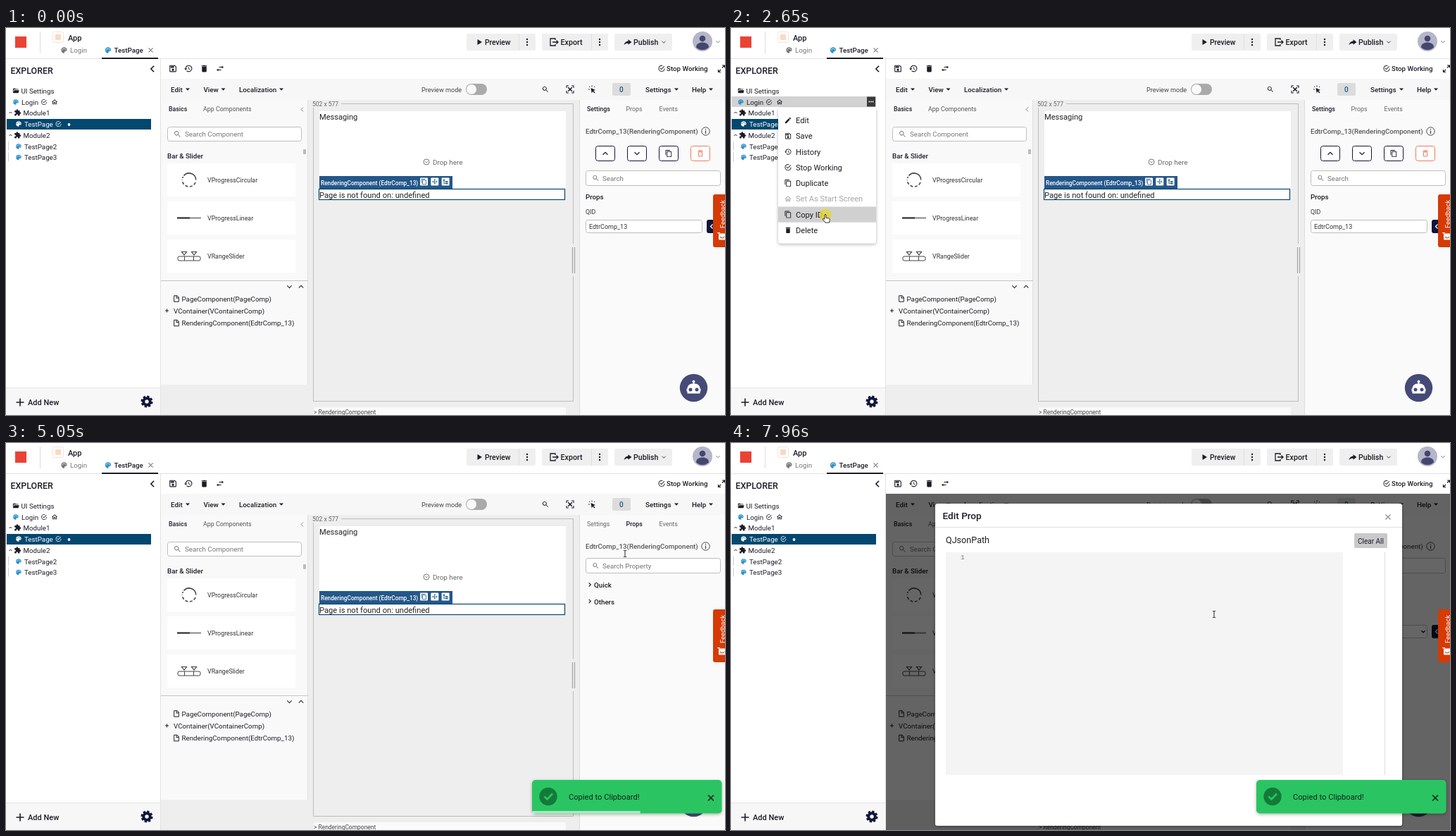
Write an HTML page that moves like this. It is 1021 by 549 pixels and loops after 8000 ms.

```html
<!DOCTYPE html>
<html lang="en">
<head>
<meta charset="utf-8">
<title>Page editor</title>
<style>
html, body { margin: 0; width: 100%; height: 100%; overflow: hidden; background: #fff; }
svg { display: block; width: 1021px; height: 549px; font-family: Roboto, Arial, sans-serif; }
#bar { transform-box: fill-box; transform-origin: 0 0; }
</style>
</head>
<body>
<svg id="stage" viewBox="0 0 1021 549"></svg>
<script>
const LOOP = 8000;
const INK = '#1c1c28', NAVY = '#11143a', BLUE = '#04476f', GREY = '#757575', SKY = '#2b8fce';

const ICONS = {
  save: 'M17 3H5a2 2 0 0 0-2 2v14a2 2 0 0 0 2 2h14a2 2 0 0 0 2-2V7zm2 16H5V5h11l3 3zM12 12a3 3 0 1 0 0 6 3 3 0 0 0 0-6zM6 6h9v4H6z',
  history: 'M13.5 8H12v5l4.3 2.5.7-1.2-3.5-2.1zM13 3a9 9 0 0 0-9 9H1l4 4 4-4H6a7 7 0 1 1 2 5l-1.4 1.4A9 9 0 1 0 13 3z',
  trash: 'M6 19a2 2 0 0 0 2 2h8a2 2 0 0 0 2-2V7H6zM19 4h-3.5l-1-1h-5l-1 1H5v2h14z',
  bin: 'M6 19a2 2 0 0 0 2 2h8a2 2 0 0 0 2-2V7H6zM8 9h8v10H8zM19 4h-3.5l-1-1h-5l-1 1H5v2h14z',
  swap: 'M22 8l-5-4v3h-8v2h8v3zM7 12l-5 4 5 4v-3h8v-2H7z',
  palette: 'M12 2a10 10 0 0 0 0 20c2 0 2-2 1-3s0-3 2-3h2a5 5 0 0 0 5-5c0-5-5-9-10-9zM5 10a1.6 1.6 0 1 0 3 0 1.6 1.6 0 0 0-3 0zM8 6a1.6 1.6 0 1 0 3 0 1.6 1.6 0 0 0-3 0zM13 6a1.6 1.6 0 1 0 3 0 1.6 1.6 0 0 0-3 0zM16 10a1.6 1.6 0 1 0 3 0 1.6 1.6 0 0 0-3 0z',
  folder: 'M19 20H4a2 2 0 0 1-2-2V6a2 2 0 0 1 2-2h6l2 2h7a2 2 0 0 1 2 2H4v10l2-8h17l-2 8.5c-.2.9-1 1.5-2 1.5z',
  puzzle: 'M20.5 11H19V7a2 2 0 0 0-2-2h-4V3.5a2.5 2.5 0 0 0-5 0V5H4a2 2 0 0 0-2 2v3.8h1.5a2.7 2.7 0 0 1 0 5.4H2V20a2 2 0 0 0 2 2h3.8v-1.5a2.7 2.7 0 0 1 5.4 0V22H17a2 2 0 0 0 2-2v-4h1.5a2.5 2.5 0 0 0 0-5z',
  check: 'M20 12a8 8 0 1 1-6-7.7l1.8-1.6A10 10 0 1 0 22 12zM8 10l-1.5 1.5L11 16 21 6l-1.4-1.4L11 13z',
  home: 'M12 5.7l5 4.5V18h-2v-6H9v6H7v-7.8zM12 3L2 12h3v8h6v-6h2v6h6v-8h3z',
  copy: 'M19 21H8V7h11zm0-16H8a2 2 0 0 0-2 2v14a2 2 0 0 0 2 2h11a2 2 0 0 0 2-2V7a2 2 0 0 0-2-2zm-3-4H4a2 2 0 0 0-2 2v14h2V3h12z',
  search: 'M9.5 3a6.5 6.5 0 0 1 4.9 10.7l6.1 5.3-1.5 1.5-5.3-6A6.5 6.5 0 1 1 9.5 3zm0 2a4.5 4.5 0 1 0 0 9 4.5 4.5 0 0 0 0-9z',
  pencil: 'M20.7 7c.4-.4.4-1 0-1.4l-2.3-2.3a1 1 0 0 0-1.4 0l-1.8 1.8 3.7 3.7zM3 17.2V21h3.8l11-11-3.7-3.8z',
  file: 'M13 9h5.5L13 3.5zM6 2h8l6 6v12a2 2 0 0 1-2 2H6a2 2 0 0 1-2-2V4c0-1.1.9-2 2-2zm5 2H6v16h12v-9h-7z',
  robot: 'M12 2a2 2 0 0 1 1 3.7V7h1a7 7 0 0 1 7 7h1v4h-1v3H3v-3H2v-4h1a7 7 0 0 1 7-7h1V5.7A2 2 0 0 1 12 2zM7.5 13a2.5 2.5 0 1 0 0 5 2.5 2.5 0 0 0 0-5zm9 0a2.5 2.5 0 1 0 0 5 2.5 2.5 0 0 0 0-5z',
  share: 'M13 9V5l9 7-9 7v-4C8 15 5 16 2 20c1-6 4-10 11-11z',
  move: 'M11 11V6H8l4-4 4 4h-3v5h5V8l4 4-4 4v-3h-5v5h3l-4 4-4-4h3v-5H6v3l-4-4 4-4v3z',
  tree: 'M3 3h7v5H7v3h6V9h8v5h-8v-1H7v5h6v-2h8v5h-8v-1H5V8H3z'
};

const text = (x, y, s, size = 9.75, fill = INK, weight = 400, more = '') =>
  `<text x="${x}" y="${y}" font-size="${size}" fill="${fill}" font-weight="${weight}" ${more}>${s}</text>`;
const bold = (x, y, s, size = 9.75, fill = INK) => text(x, y, s, size, fill, 500);
const rect = (x, y, w, h, fill, more = '') =>
  `<rect x="${x}" y="${y}" width="${w}" height="${h}" fill="${fill}" ${more}/>`;
const box = (x, y, w, h, stroke = '#bdbdbd', fill = '#fff', r = 3) =>
  rect(x + .5, y + .5, w - 1, h - 1, fill, `stroke="${stroke}" rx="${r}"`);
const line = (d, stroke = INK, w = 1, more = '') =>
  `<path d="${d}" fill="none" stroke="${stroke}" stroke-width="${w}" ${more}/>`;
const shape = (d, fill = INK) => `<path d="${d}" fill="${fill}"/>`;
const dot = (x, y, r, fill, more = '') => `<circle cx="${x}" cy="${y}" r="${r}" fill="${fill}" ${more}/>`;
const icon = (name, x, y, size = 12, fill = INK) =>
  `<path d="${ICONS[name]}" fill="${fill}" fill-rule="evenodd" transform="translate(${x - size / 2} ${y - size / 2}) scale(${size / 24})"/>`;
const group = (id, ...parts) => `<g id="${id}">${parts.join('')}</g>`;
const caret = (x, y) => shape(`M${x - 3} ${y - 1.5}h6l-3 3.2z`);
// dir is one of u, r, d, l
const chevron = (x, y, dir, s = 3, stroke = INK, w = 1.2) => {
  const turn = { u: 0, r: 90, d: 180, l: 270 }[dir];
  return line(`M${-s} ${s / 2}L0 ${-s / 2}L${s} ${s / 2}`, stroke, w, `transform="translate(${x} ${y}) rotate(${turn})"`);
};
const cross = (x, y, s, stroke, w = 1) =>
  line(`M${x - s} ${y - s}l${2 * s} ${2 * s}m0 ${-2 * s}l${-2 * s} ${2 * s}`, stroke, w);
const dots = (x, y, dx, dy, fill, r = 1.2) => [-1, 0, 1].map(k => dot(x + k * dx, y + k * dy, r, fill)).join('');

const header = () => [
  rect(0, 43, 1021, 1, '#e2e2e2'),
  rect(13, 12, 16, 16, '#ea4335'),
  rect(48, 5, 1, 31, '#dedede'),
  box(66, 5, 16, 16, '#f1e4dc', '#fff', 2), rect(70, 9, 8, 8, '#fbd9c4'),
  bold(88, 17.5, 'App', 11),
  icon('palette', 82.5, 31.5, 10, GREY), text(91, 35, 'Login', 9.75, GREY),
  icon('palette', 145, 31.5, 10, SKY), bold(153.5, 35, 'TestPage'),
  cross(205.5, 31.5, 3, '#444'), rect(136, 42, 80, 2, INK),
  rect(654, 8, 98, 24, '#efefef', 'rx="2"'), rect(728, 8, 1, 24, '#e0e0e0'),
  shape('M669.5 16v8l6.5-4z'), bold(680, 23.5, 'Preview', 10.3), dots(740, 20, 0, 4, INK),
  rect(761, 8, 94, 24, '#efefef', 'rx="2"'), rect(831, 8, 1, 24, '#e0e0e0'),
  line('M780 17v-2h-7v10h7v-2M776 20h8m-2.5-2.5l2.5 2.5l-2.5 2.5', INK, 1.3),
  bold(787.5, 23.5, 'Export', 10.7), dots(843, 20, 0, 4, INK),
  rect(864, 8, 82, 24, '#efefef', 'rx="2"'),
  icon('share', 883, 20, 13), bold(891, 23.5, 'Publish', 10.6), chevron(934, 20, 'd', 2.6, '#444', 1),
  dot(989, 19, 14, '#b5b6c8'), dot(989, 15, 4.3, '#45466f'),
  shape('M980 27.5c0-5 4-7 9-7s9 2 9 7a13 13 0 0 1-18 0z', '#45466f'),
  chevron(1011, 19.5, 'd', 2.6, '#777', 1)
].join('');

const moreButton = y => rect(193, y, 12, 14, '#3a3a3a') + dots(199, y + 7, 2.6, 0, '#fff', .9);

const sidebar = () => [
  rect(219, 44, 1, 505, '#e2e2e2'),
  bold(6.5, 65, 'EXPLORER', 12.4), chevron(208, 58, 'l', 4.2, INK, 1.6),
  group('hoverModule', rect(1, 113, 205, 15, '#d2d2d2'), line('M184.5 120.5h6m-3-3v6', '#555'), moreButton(113)),
  group('hoverLogin', rect(1, 97, 205, 15, '#d2d2d2'), moreButton(97.5)),
  icon('folder', 14, 89, 10), text(21.5, 92.5, 'UI Settings'),
  icon('palette', 14, 105, 9, SKY), text(22, 108.5, 'Login'), icon('check', 54, 105, 9.5), icon('home', 69, 105, 10),
  ...[['Module1', 120], ['Module2', 152]].map(([name, y]) =>
    chevron(6.5, y, 'u', 2, INK, 1) + icon('puzzle', 16.5, y, 10.5) + text(24.5, y + 4, name)),
  rect(1, 129, 205, 15, BLUE),
  icon('palette', 18, 136, 9, '#fff'), text(26, 140, 'TestPage', 9.75, '#fff'),
  icon('check', 74.5, 136, 9.5, '#fff'), dot(89.5, 137, 1.9, '#fff'),
  ...[['TestPage2', 168], ['TestPage3', 183.5]].map(([name, y]) =>
    rect(3, y - 7, 1, 13, '#ccc') + icon('palette', 18, y, 9, SKY) + text(26, y + 3.5, name)),
  rect(0, 511, 219, 38, '#f7f7f7'), rect(0, 510, 219, 1, '#e4e4e4'),
  line('M14.5 531h11m-5.5-5.5v11', INK, 1.6), bold(31, 535, 'Add New', 11),
  dot(200, 530, 4.7, 'none', `stroke="${NAVY}" stroke-width="4"`),
  dot(200, 530, 7, 'none', `stroke="${NAVY}" stroke-width="3" stroke-dasharray="3.2 2.3"`)
].join('');

const toolbars = () => [
  icon('save', 237, 57.5, 13), icon('history', 259, 57.5, 13), icon('trash', 281.5, 57.5, 13), icon('swap', 304, 57.5, 12),
  icon('check', 931, 57.5, 11), bold(938, 61, 'Stop Working'),
  line('M1011.5 59v3.5h3.5m-3.5 0l3.5-3.5M1017 53h3.5v3.5m0-3.5l-3.5 3.5', INK, 1.2),
  rect(220, 72, 801, 30, '#f7f7f7'),
  bold(234, 90.5, 'Edit'), caret(258, 87), bold(280.5, 90.5, 'View'), caret(308.5, 87),
  bold(331, 90.5, 'Localization'), caret(391, 87),
  text(590, 90.5, 'Preview mode', 9.1, '#444'),
  rect(653, 79, 30, 16, '#aaa', 'rx="8"'), dot(661, 87, 7, '#fafafa'),
  icon('search', 766, 87, 11),
  line('M796 85v-3h3m4 0h3v3m0 4v3h-3m-4 0h-3v-3', INK, 1.1), cross(801, 87, 2.8, INK, 1.6),
  shape('M830.5 85l6.5 3-2.8 1 2.3 2.6-1 1-2.4-2.6-1.4 2.4z'), line('M828 83l1 1M832 81.5v1.8M827 87h1.8M836 83l-1 1', INK, 1),
  rect(861, 78, 26, 18, '#dcdcdc', 'rx="2"'), bold(871, 90.5, '0', 10, '#1b5a80'),
  bold(908, 90.5, 'Settings', 9.9), caret(952, 87), bold(974, 90.5, 'Help', 9.9), caret(1001, 87)
].join('');

const palettePanel = () => [
  rect(220, 102, 209, 404, '#f9f9f9'), rect(220, 506, 209, 43, '#eee'), rect(428, 102, 1, 404, '#e0e0e0'),
  bold(231, 118, 'Basics', 8.8), text(280, 118, 'App Components', 8.9, '#555'), chevron(420.5, 115.5, 'l', 3, '#888', 1),
  box(229, 140, 191, 21), icon('search', 243.5, 150.5, 12, GREY), text(254, 154, 'Search Component', 9.75, GREY),
  bold(229, 184.5, 'Bar &amp; Slider'), rect(422, 172, 4, 7, '#bbb', 'rx="1"'),
  ...['VProgressCircular', 'VProgressLinear', 'VRangeSlider'].map((name, k) => {
    const y = 192 + 54 * k;
    const hover = k === 1 ? group('hoverCard', rect(229, y, 182, 47, '#eee')) : '';
    return rect(229, y, 182, 47, '#fff') + hover + text(286, y + 26.5, name, 8.85, '#333');
  }),
  line('M252.5 209.5A9.7 9.7 0 0 1 269.7 215.5', '#444', 1.6),
  line('M269 219A9.7 9.7 0 0 1 250.3 215M250.5 213l1-2', '#444', 1.6, 'stroke-dasharray="4 2.6"'),
  rect(243, 268.5, 34, 2, '#888'), rect(243, 268.5, 18, 2, '#333'),
  box(243.5, 323.5, 33, 7, '#444', '#fff', 2), line('M253.5 324v6M266.5 324v6', '#444'),
  line('M249.5 317.5h7l-3.5 4.5zM263.5 317.5h7l-3.5 4.5z', '#444', 1.2),
  rect(220, 358, 209, 1, '#c4c4c4'), chevron(402.5, 367, 'd', 3.2, '#333'), chevron(419, 367, 'u', 3.2, '#333'),
  icon('file', 242, 384, 11.5), text(249.5, 387.5, 'PageComponent(PageComp)'),
  line('M226 401h5m-2.5-2.5v5', INK), text(238, 405, 'VContainer(VContainerComp)'),
  icon('file', 242, 418.5, 11.5), text(249.5, 422, 'RenderingComponent(EdtrComp_13)')
].join('');

const chipIcons = (x, y, ink) => ['copy', 'move', 'tree'].map((name, k) =>
  rect(x + 15.3 * k, y, 11, 11, '#fff', 'rx="1"') + icon(name, x + 5.5 + 15.3 * k, y + 5.5, 9, ink)).join('');

const canvasArea = () => [
  rect(429, 102, 385, 447, '#eee'),
  text(435, 111, '502 x 577', 8.5, '#666'),
  line('M476 107.5h329.5V306M805.5 352V529.5H436.5V113', '#bdbdbd'),
  line('M804.5 311v37M807.5 311v37', '#a5a5a5', 1.2),
  rect(445, 118, 350, 110, '#fff'), text(445, 130, 'Messaging', 11.1, '#222'),
  dot(597, 190, 4, 'none', 'stroke="#777"'), chevron(597, 190.2, 'd', 1.8, '#777', 1), text(606, 193.5, 'Drop here', 9.9, '#666'),
  group('outlines',
    rect(453.5, 160.5, 332, 59, 'none', 'stroke="#8ba5bd" stroke-dasharray="2 1.5"'),
    rect(461.5, 169, 315.5, 41.5, 'none', 'stroke="#8ba5bd" stroke-dasharray="2 1.5"'),
    rect(453, 142, 116, 18, '#7f9db8'), text(455.5, 154.5, 'VCol (VColComp)', 8.4, '#16304a'), chipIcons(522.5, 145, '#4d708f'),
    rect(461, 151, 70, 18, '#7294b0'), text(463, 163, 'VCol (VColComp)', 8.4, '#10283f')),
  rect(444.5, 228.5, 349, 15, '#fff', `stroke="${BLUE}" stroke-width="1.2"`),
  text(445, 240.5, 'Page is not found on: undefined', 11.15, '#222'),
  rect(445, 210, 189, 18, '#24578a'), bold(447, 222.5, 'RenderingComponent (EdtrComp_13)', 8.25, '#fff'), chipIcons(588, 212.5, '#24578a'),
  rect(437, 538, 358, 11, '#fafafa'), text(437, 547.5, '&gt; RenderingComponent', 8.45, '#444')
].join('');

const tabs = active => [['Settings', 825], ['Props', 880.5], ['Events', 927.5]].map(([name, x]) =>
  name === active ? bold(x, 118, name, 8.9) : text(x, 118, name, 8.9, '#666')).join('');
const searchField = (y, label) => box(823, y, 192, 22) + icon('search', 837.5, y + 11, 11, GREY) + text(847, y + 14.5, label, 9.75, GREY);
const codeButton = y => rect(995, y, 20, 19, NAVY, 'rx="3"') + chevron(1002, y + 9.5, 'l', 3, '#fff', 1.3);

const inspector = () => [
  rect(814, 102, 207, 447, '#fafafa'), rect(814, 102, 1, 447, '#ddd'),
  bold(823, 150, 'EdtrComp_13(RenderingComponent)', 9.68, '#555'),
  dot(993.5, 146.5, 5.7, 'none', 'stroke="#444"'), line('M993.5 145.5v4.5M993.5 143v1.3', '#444', 1.2),
  group('settingsPanel', tabs('Settings'),
    ...[837, 882, 927, 972].map((x, k) => box(x, 167, 28, 22, k === 3 ? '#ee7b5c' : NAVY)),
    chevron(851, 178, 'u', 3.5), chevron(896, 178, 'd', 3.5), icon('copy', 941, 178, 11), icon('bin', 986, 178, 12, '#ee7b5c'),
    searchField(202, 'Search'), bold(823, 243, 'Props'), text(823, 264, 'QID', 8.8, '#333'),
    box(823, 272, 166, 19), text(828, 285, 'EdtrComp_13', 9, '#333'), codeButton(272)),
  group('propsPanel', tabs('Props'), searchField(163, 'Search Property'),
    chevron(829, 201, 'r', 2.6), bold(835, 205, 'Quick'), bold(835, 229, 'Others'),
    group('closed', chevron(829, 224.5, 'r', 2.6)),
    group('opened', chevron(829, 225, 'd', 2.6), text(823, 249.5, 'QJsonPath', 8.9, '#333'),
      box(823, 258, 166, 19), chevron(983, 267.5, 'd', 2.6, INK, 1.4), codeButton(258))),
  dot(976.5, 510.5, 19.7, '#454a77'), icon('robot', 976.5, 509.5, 24, '#fff')
].join('');

const menuItems = [['pencil', 'Edit'], ['save', 'Save'], ['history', 'History'], ['check', 'Stop Working'],
  ['copy', 'Duplicate'], ['home', 'Set As Start Screen'], ['copy', 'Copy ID'], ['trash', 'Delete']];
const STEP = 22.25;
const menu = () => group('menu',
  rect(67, 113, 139, 192.5, '#fff', 'rx="4" filter="url(#shadow)"'),
  group('hoverItem', rect(67, 120, 139, STEP, '#d0d0d0')),
  ...menuItems.map(([name, label], k) => {
    const y = 131 + STEP * k, fill = k === 5 ? '#a5a5a5' : INK;
    return icon(name, 81, y, 11, fill) + text(92, y + 4, label, 11.1, fill);
  }));

const modal = () => group('modal',
  rect(220, 72, 801, 477, '#000', 'opacity=".6"'),
  rect(290, 86, 663, 457, '#fff', 'rx="3" filter="url(#shadow)"'),
  bold(300.5, 108, 'Edit Prop', 13.6), cross(933, 105, 3.5, '#888', 1.1), rect(290, 119, 663, 1, '#e0e0e0'),
  text(305, 142, 'QJsonPath', 12.6), rect(885, 128, 47, 21, '#c9c9c9', 'rx="2"'), text(890, 143, 'Clear All', 10),
  rect(305, 155, 564, 316, '#f4f4f4'), rect(928, 155, 1, 316, '#ddd'),
  text(326, 165, '1', 9.5, '#777', 400, 'font-family="Liberation Mono, monospace"'));

const feedback = () => rect(1004, 236, 24, 75, '#d63a05', 'rx="3"') +
  text(0, 0, 'Feedback', 9.3, '#fff', 400, 'transform="translate(1020.5 284) rotate(-90)"') +
  rect(1012, 291.5, 12, 9, '#fff', 'rx="1"') + line('M1014 296q3 4 6 0', '#d63a05', 1.2) + shape('M1012 292l-2.5-2h5z', '#fff');

const toast = () => group('toast',
  rect(747, 478, 269.5, 47.5, '#2ac562', 'rx="5" filter="url(#shadow)"'),
  dot(770, 501.5, 12.7, '#147a3a'), line('M764.5 501.5l4 4l7.5-8', '#2ac562', 2.6),
  text(799, 505.5, 'Copied to Clipboard!', 11.15, '#14251a'), cross(1001, 503.5, 4, '#14251a', 1.7),
  rect(748, 522, 268, 3.5, '#fff', 'id="bar" opacity=".6"'));

const mouse = () => group('mouse',
  group('halo', dot(0, 1, 8.5, '#e6d62c', 'opacity=".8"')),
  group('arrow', `<path d="M0 0v11l2.6-2.3 1.8 4 1.6-.7-1.8-3.9h3.4z" fill="#fff" stroke="#222" stroke-width=".9"/>`),
  group('hand', `<path d="M-1 1q1-1.6 2 0v4.2l4.2.9q1.4.5 1.2 2l-.9 4H0l-4-5q.6-1.8 3 .2z" fill="#fff" stroke="#222" stroke-width=".9"/>`),
  group('beam', line('M-2 -4.5h1.5l.5.5l.5-.5H2M0 -4v8M-2 4.5h1.5l.5-.5l.5.5H2', '#222')));

document.getElementById('stage').innerHTML =
  '<defs><filter id="shadow" x="-10%" y="-20%" width="120%" height="150%"><feDropShadow dx="0" dy="1.5" stdDeviation="2" flood-opacity=".3"/></filter></defs>' +
  [header, sidebar, toolbars, palettePanel, canvasArea, inspector, menu, modal, feedback, toast, mouse].map(draw => draw()).join('');

// Steps are [ms, value]; the first and last values extend to the loop's ends.
const start = document.timeline.currentTime ?? performance.now();
const run = (id, prop, steps, easing) => {
  const lead = steps[0][0] > 0 ? [[0, steps[0][1]]] : [];
  const tail = steps.at(-1)[0] < LOOP ? [[LOOP, steps.at(-1)[1]]] : [];
  document.getElementById(id).animate(
    [...lead, ...steps, ...tail].map(([ms, value]) => ({ offset: ms / LOOP, [prop]: value, easing })),
    { duration: LOOP, iterations: Infinity }
  ).startTime = start;
};
const show = (id, ...spans) => {
  const steps = spans.flatMap(([from, to = LOOP]) => [[from, 1], [to, to < LOOP ? 0 : 1]]);
  run(id, 'opacity', spans[0][0] > 0 ? [[0, 0], ...steps] : steps, 'steps(1)');
};
const at = (x, y) => `translate(${x}px, ${y}px)`;

show('hoverCard', [380, 760]);
show('hoverModule', [1000, 1170]);
show('hoverLogin', [1170, 2780]);
show('menu', [1490, 2780]);
show('outlines', [3560, 3860]);
show('settingsPanel', [0, 4840]);
show('propsPanel', [4840]);
show('closed', [4840, 5660]);
show('opened', [5660]);
show('modal', [7110]);
show('halo', [1490, 1620], [2650, 2780], [4770, 4840], [5600, 5660], [6930, 7050]);
show('mouse', [130]);
show('arrow', [130, 1000], [2780, 4600], [5900, 6420], [7110, 7420]);
show('hand', [1000, 2780], [4600, 4940], [5240, 5900], [6420, 7110]);
show('beam', [4940, 5240], [7420]);

show('hoverItem', [2040]);
run('hoverItem', 'transform', [0, 1, 2, 3, 4, 6].map(k => [2040 + 50 * k, at(0, STEP * k)]), 'steps(1)');

const path = [[130, 902, 510], [400, 300, 262], [670, 300, 262], [1080, 194, 114], [1290, 199, 104], [1970, 199, 104],
  [2390, 134, 264], [3110, 134, 264], [3790, 808, 263], [3930, 808, 263], [4700, 892, 116], [4840, 892, 116],
  [5050, 879, 157], [5500, 850, 226], [5700, 850, 226], [6500, 1001, 270], [7120, 1001, 270], [7960, 686, 243]];
run('mouse', 'transform', path.map(([ms, x, y]) => [ms, at(x, y)]), 'ease-in-out');

run('toast', 'transform', [[2900, 3000], [3350, -25], [3460, 10], [3575, -5], [3650, 0], [7900, 0], [7960, -1]]
  .map(([ms, x]) => [ms, at(x, 0)]), 'cubic-bezier(.215, .61, .355, 1)');
run('bar', 'transform', [[2900, 'scaleX(1)'], [7900, 'scaleX(0)']], 'linear');
</script>
</body>
</html>
```
